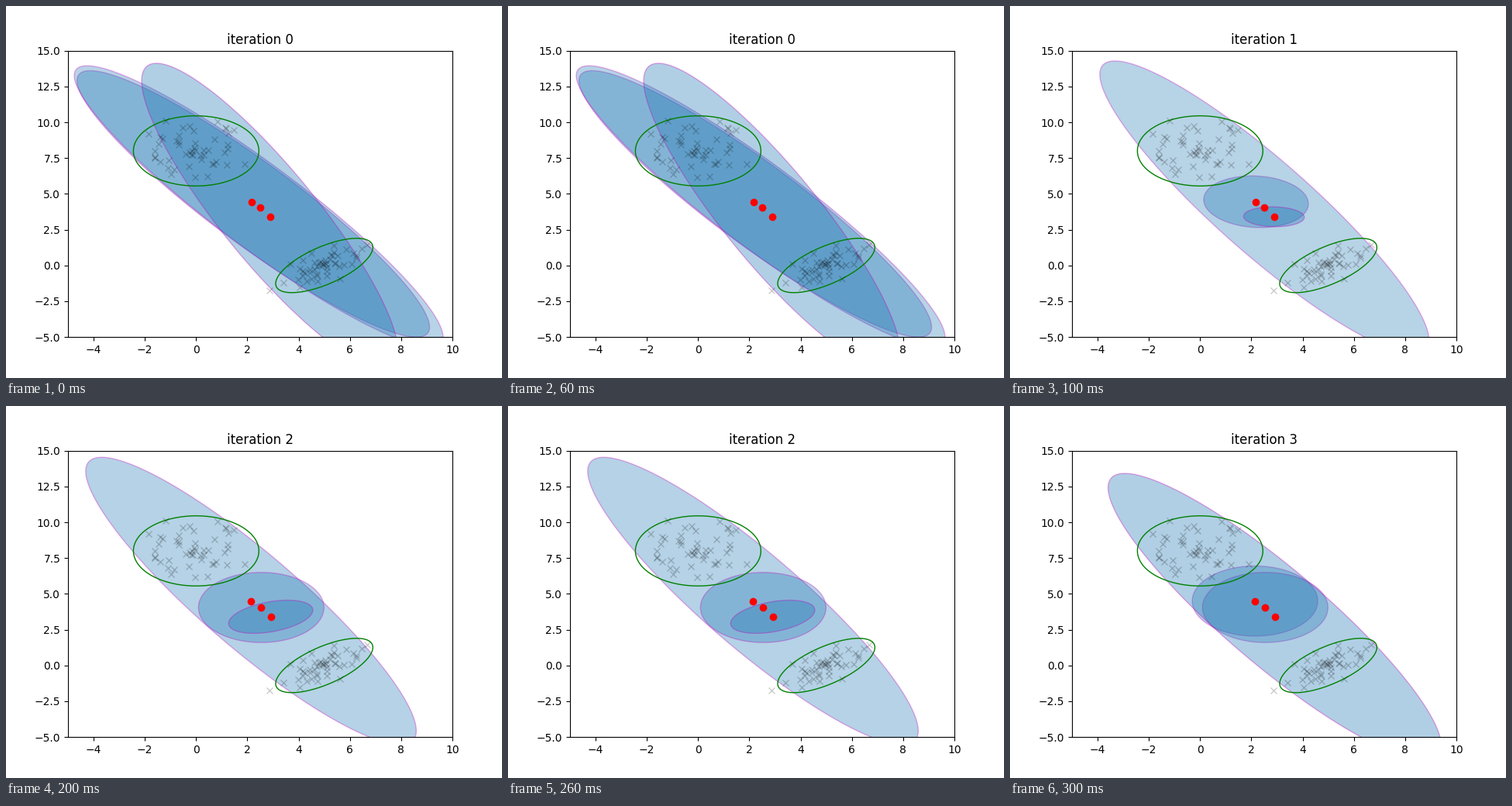
These frames come from a looping animation (640 by 480 pixels, 400 ms). A matplotlib script:

```python
import numpy as np
import matplotlib.pyplot as plt
from matplotlib.animation import FuncAnimation
from matplotlib.patches import Polygon

K = np.sqrt(5.991)  # 95 % contour of a 2D normal
WEIGHTS = (0.33, 0.32, 0.35)
UNIT = (1, 1, 0)

# Component means, their late drift, and the centres of the first contours
MEANS = np.array([(2.18, 4.45), (2.51, 4.05), (2.88, 3.4)])
DRIFT = np.array([(-0.04, 0.05), (0.03, 0), (0.03, 0)])
START = np.array([(2.23, 4.3), (2.44, 4.13), (2.88, 3.42)])

# Standard deviations and correlation of each component per iteration
SPREADS = [
    [(2.81, 3.8, -0.925), (2.94, 4.01, -0.93), (2.045, 4.37, -0.885)],
    [(0.834, 0.736, -0.08), (2.625, 4.18, -0.908), (0.484, 0.283, -0.05)],
    [(2.635, 4.1, -0.903), UNIT, (0.671, 0.473, 0.4)],
    [UNIT, UNIT, (2.656, 4.09, -0.9)],
]

# The two true clusters: mean, spread and the outermost samples
SIDE = np.sqrt(0.6)
CLUSTERS = [
    ((0, 8), UNIT,
     [(-1.19, 10.1), (0.84, 10.05), (-0.25, 9.73), (-1.86, 9.2), (1.47, 9.45),
      (1.9, 7.07), (-0.04, 6.16), (0.45, 6.2), (-0.85, 6.7), (-1.4, 7.25)]),
    ((5, 0), (SIDE, SIDE, 2 / 3),
     [(2.87, -1.75), (3.41, -1.2), (4.04, -1.53), (3.68, 0.08), (5.37, 1.42),
      (6.46, 1.18), (6.66, 1.44), (5.86, 1.15), (4.5, 0.85), (5.62, -0.93)]),
]


def contour(mean, spread):
    """Points on the 95 % ellipse of a normal."""
    t = np.linspace(0, 2 * np.pi, 240, endpoint=False)
    sx, sy, rho = spread
    return np.column_stack([mean[0] + K * sx * np.cos(t),
                            mean[1] + K * sy * np.cos(t - np.arccos(rho))])


def sample(rng, mean, spread, n=40, core=0.8):
    """Random samples of the dense middle of a cluster."""
    sx, sy, rho = spread
    u, v = core * rng.standard_normal((2, n)).clip(-2, 2)
    return np.column_stack([mean[0] + sx * u,
                            mean[1] + sy * (rho * u + np.sqrt(1 - rho ** 2) * v)])


fig, ax = plt.subplots(figsize=(6.4, 4.8), dpi=100)
ax.set(xlim=(-5, 10), ylim=(-5, 15))

blobs = [ax.add_patch(Polygon(contour(m, s), facecolor="C0", edgecolor="m", alpha=w))
         for m, s, w in zip(START, SPREADS[0], WEIGHTS)]

rng = np.random.default_rng(8)
for mean, spread, outer in CLUSTERS:
    ax.add_patch(Polygon(contour(mean, spread), fill=False, edgecolor="g"))
    points = np.vstack([sample(rng, mean, spread), outer])
    ax.plot(*points.T, "kx", alpha=0.2)

dots, = ax.plot([], [], "ro")


def draw(i):
    means = MEANS + DRIFT * (i > 1)
    centres = means if i else START
    for blob, c, s in zip(blobs, centres, SPREADS[i]):
        blob.set_xy(contour(c, s))
    dots.set_data(*means.T)
    ax.set_title(f"iteration {i}")
    return [*blobs, dots]


anim = FuncAnimation(fig, draw, frames=len(SPREADS), interval=100,
                     repeat=True, repeat_delay=0, blit=False)
plt.show()
```
